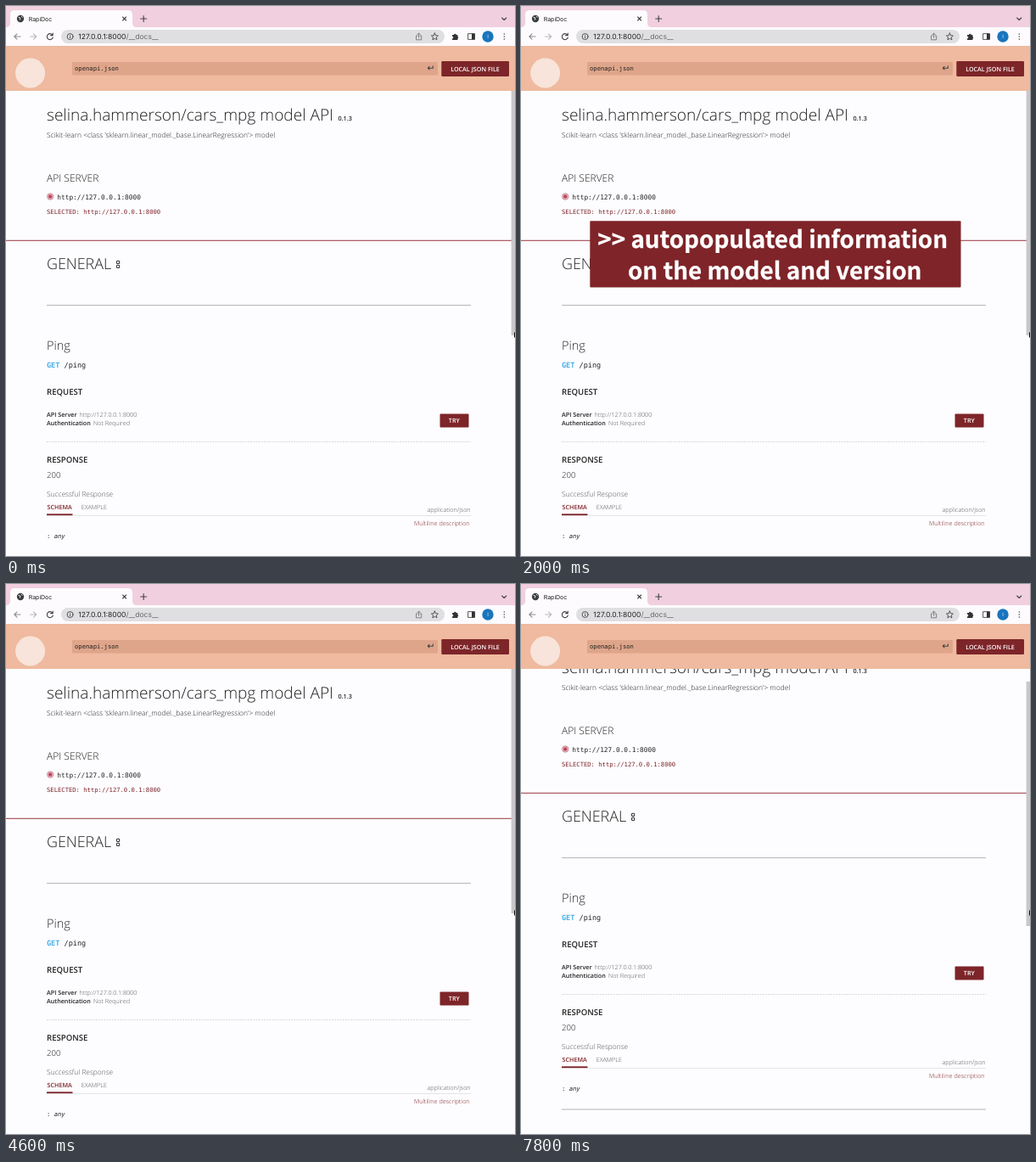
Write an HTML page that moves like this. It is 600 px wide and 648 px high and loops after 8 s.

```html
<!DOCTYPE html>
<html lang="en">
<head>
<meta charset="utf-8">
<title>API docs</title>
<style>
  html, body { margin: 0; width: 100%; height: 100%; overflow: hidden; background: #fdfcfe; }
  svg { display: block; width: 600px; height: 648px; }
  text { font-family: "Open Sans", sans-serif; font-size: 7.2px; font-weight: 400; fill: #222;
         text-rendering: geometricPrecision; white-space: pre; }
  .mono { font-family: "DejaVu Sans Mono", "Liberation Mono", monospace; }
  .ui { font-family: Inter, Roboto, sans-serif; }
  .light { font-weight: 300; }
  .bold { font-weight: 600; }
  .title { font-size: 19.1px; }
  .body { font-size: 8.4px; }
  .head { font-size: 9.6px; }
  .gray { fill: #555; }
  .wine { fill: #7d2529; }
  .white { fill: #fff; }
  .end { text-anchor: end; }
  .mid { text-anchor: middle; }
  .icon { fill: none; stroke: #444; stroke-width: 1.1; stroke-linecap: round; stroke-linejoin: round; }
  #caption text { font: 700 27.8px "Noto Sans CJK JP", "Noto Sans CJK SC", "Noto Sans", sans-serif;
                  stroke: #fff; stroke-width: .3; }
</style>
</head>
<body>
<svg viewBox="0 0 600 648">
  <rect width="600" height="648" fill="#fdfcfe"/>

  <g id="page">
    <circle cx="52.2" cy="224.5" r="3.7" fill="#f3cbd3" stroke="#c1808b" stroke-width=".9"/>
    <circle cx="52.2" cy="224.5" r="2.3" fill="#bd4560"/>
    <path d="M0 276.3H596" stroke="#96393f"/>
    <g fill="none" stroke="#333" stroke-width="1.1">
      <rect x="130.5" y="300.3" width="3.2" height="3.2" rx="1"/>
      <rect x="130.5" y="305.3" width="3.2" height="3.2" rx="1"/>
    </g>
    <path d="M48 352.6H548M48 649H548" stroke="#b3b2b5"/>
    <rect x="511.5" y="480.5" width="34" height="16" rx="1" fill="#7d2529"/>
    <path d="M48 513.5H548" stroke="#cfced1" stroke-width=".8" stroke-dasharray="2 1.2"/>
    <path d="M48 600.5H548" stroke="#dddce0" stroke-width=".8"/>
    <path d="M48 599.2H78.5" stroke="#7d2529" stroke-width="1.8"/>
  </g>

  <rect id="thumb" x="595.6" y="100" width="4.4" height="288" fill="#c9c7ca"/>
  <path d="M599 384V391L600 390V385Z" fill="#111"/>

  <g id="chrome">
    <rect width="600" height="26" fill="#f1cfde"/>
    <path d="M0 25Q5 25 5 20V10Q5 5 10 5H144Q149 5 149 10V20Q149 25 154 25H600V47H0Z" fill="#fdfbfd"/>
    <circle cx="17" cy="15" r="4.2" fill="#3c4043"/>
    <path d="M14.5 13.2L17 14.2L16.2 16.4M18 12L19.5 13.5" fill="none" stroke="#fff" stroke-width=".9"/>
    <g class="icon">
      <path d="M137.6 13L141.6 17M141.6 13L137.6 17M158.7 15H165.7M162.2 11.5V18.5"/>
      <path d="M584.7 14L587.2 16.5L589.7 14"/>
      <path d="M17 36H10M13 32.8L9.8 36L13 39.2" stroke="#8b8b90"/>
      <path d="M28.5 36H35.5M32.5 32.8L35.7 36L32.5 39.2" stroke="#b9b9be"/>
      <path d="M54.7 34A3.5 3.5 0 1 0 55.3 37M55.2 32V34.6H52.6"/>
    </g>
    <rect x="65" y="28" width="452" height="16" rx="8" fill="#dfdee1"/>
    <g class="icon" style="stroke-width:.9">
      <circle cx="75.6" cy="36" r="3.5"/>
      <path d="M75.6 35.8V37.7M75.6 34.2V34.3"/>
      <path d="M485 35H483.5V39.8H489.7V35H488.2M486.6 37.4V32.2M485 33.6L486.6 32L488.2 33.6" stroke="#777"/>
      <path d="M505.4 32L506.6 34.7L509.4 35L507.3 36.9L507.9 39.8L505.4 38.3L502.9 39.8L503.5 36.9L501.4 35L504.2 34.7Z"/>
      <rect x="545" y="32.6" width="7.4" height="6.8"/>
    </g>
    <path d="M526 34H528A1.3 1.3 0 0 1 530.6 34H532.4V36A1.3 1.3 0 0 1 532.4 38.4V40H526V38.4A1.3 1.3 0 0 0 526 35.8Z" fill="#333"/>
    <rect x="549" y="32.6" width="3.6" height="6.8" fill="#333"/>
    <circle cx="568" cy="36" r="6.7" fill="#1975bd"/>
    <path d="M587.3 33V39.2" stroke="#444" stroke-width="1.5" stroke-linecap="round" stroke-dasharray="0 3"/>
    <rect y="47" width="600" height="53" fill="#efba9f"/>
    <circle cx="28.6" cy="79" r="17.5" fill="#f8e4da"/>
    <rect x="78" y="66" width="431" height="15.5" rx="1" fill="#dfa58a"/>
    <path class="icon" d="M503.3 70.7V73.2H497.3M499 71.5L497.3 73.2L499 74.9"/>
    <rect x="513.3" y="65" width="79.7" height="18" rx="1.2" fill="#7d2529"/>
  </g>

  <g id="caption">
    <rect id="panel" x="81.3" y="253.3" width="437.2" height="78.2" rx="1" fill="#7f2429"/>
  </g>
</svg>
<script>
  const LOOP = 8000;
  const byId = id => document.getElementById(id);

  // [x, baseline, classes, text, font size]
  const labels = {
    page: [
      [48, 135, 'title light', 'selina.hammerson/cars_mpg model API'],
      [391.5, 135, 'bold', '0.1.3'],
      [48, 155, 'body light', "Scikit-learn <class 'sklearn.linear_model._base.LinearRegression'> model"],
      [48, 207, 'light', 'API SERVER', 12],
      [60.3, 228, 'mono', 'http://127.0.0.1:8000', 7.8],
      [48, 245, 'mono wine', 'SELECTED: http://127.0.0.1:8000'],
      [48, 310.3, 'light', 'GENERAL', 17.9],
      [48, 405, 'light', 'Ping', 14.4],
      [68.6, 426.3, 'mono', '/ping', 8.5],
      [48, 458.3, 'head bold', 'REQUEST'],
      [48, 483.6, 'bold', 'API Server'],
      [86.5, 483.6, 'light gray', 'http://127.0.0.1:8000'],
      [48, 493.8, 'bold', 'Authentication'],
      [103, 493.8, 'light gray', 'Not Required'],
      [528.3, 491, 'bold white mid', 'TRY'],
      [48, 538, 'head bold', 'RESPONSE'],
      [48, 556.4, 'head light', '200'],
      [48, 578.4, 'body light gray', 'Successful Response'],
      [48.5, 593, 'bold wine', 'SCHEMA'],
      [88.7, 593, 'light gray', 'EXAMPLE'],
      [547.6, 596.4, 'light gray end', 'application/json'],
      [546.6, 612, 'light wine end', 'Multiline description'],
      [48, 627, 'mono', ':']
    ],
    chrome: [
      [26.7, 17.7, 'ui', 'RapiDoc', 7],
      [568, 38.2, 'ui white mid', 'I', 6],
      [81, 76, 'mono', 'openapi.json'],
      [553, 76.6, 'bold white mid', 'LOCAL JSON FILE']
    ],
    caption: [
      [296.7, 285, 'white mid', '>> autopopulated information'],
      [299.2, 322, 'white mid', 'on the model and version']
    ]
  };

  function addText(group, [x, y, classes, words, size]) {
    const el = document.createElementNS('http://www.w3.org/2000/svg', 'text');
    el.setAttribute('x', x);
    el.setAttribute('y', y);
    el.setAttribute('class', classes);
    if (size) el.style.fontSize = size + 'px';
    el.textContent = words;
    byId(group).append(el);
    return el;
  }

  function addSpan(el, words, fill) {
    const span = document.createElementNS('http://www.w3.org/2000/svg', 'tspan');
    span.textContent = words;
    span.style.fill = fill;
    el.append(span);
  }

  for (const group in labels) labels[group].forEach(row => addText(group, row));
  addText('page', [48, 426.3, 'mono bold', 'GET', 8.5]).style.fill = '#47afe8';
  addText('page', [56.7, 627, 'mono', 'any']).style.fontStyle = 'italic';
  addSpan(addText('chrome', [85.3, 39.1, 'ui', '127.0.0.1:8000', 8.5]), '/__docs__', '#666');

  // Each step is [time, value] and holds until the next one.
  function play(id, property, steps, format = v => v) {
    const frames = steps.map(([time, value]) =>
      ({ offset: time / LOOP, [property]: format(value), easing: 'steps(1, end)' }));
    frames.push({ ...frames.at(-1), offset: 1 });
    byId(id).animate(frames, { duration: LOOP, iterations: Infinity });
  }

  const shift = v => `translateY(${v}px)`;
  const scroll = [[0, 0], [7200, 3], [7400, 10], [7600, 20], [7800, 30]];

  play('caption', 'opacity',
    [[0, 0], [200, .16], [400, .56], [600, .96], [800, 1], [3400, .62], [3600, .22], [3800, 0]]);
  // The panel is duller while it fades.
  play('panel', 'fill', [[0, '#58232a'], [600, '#7f2429'], [3400, '#58232a']]);
  play('page', 'transform', scroll, v => shift(-v));
  play('thumb', 'transform', scroll, v => shift(v / 2));
</script>
</body>
</html>
```
